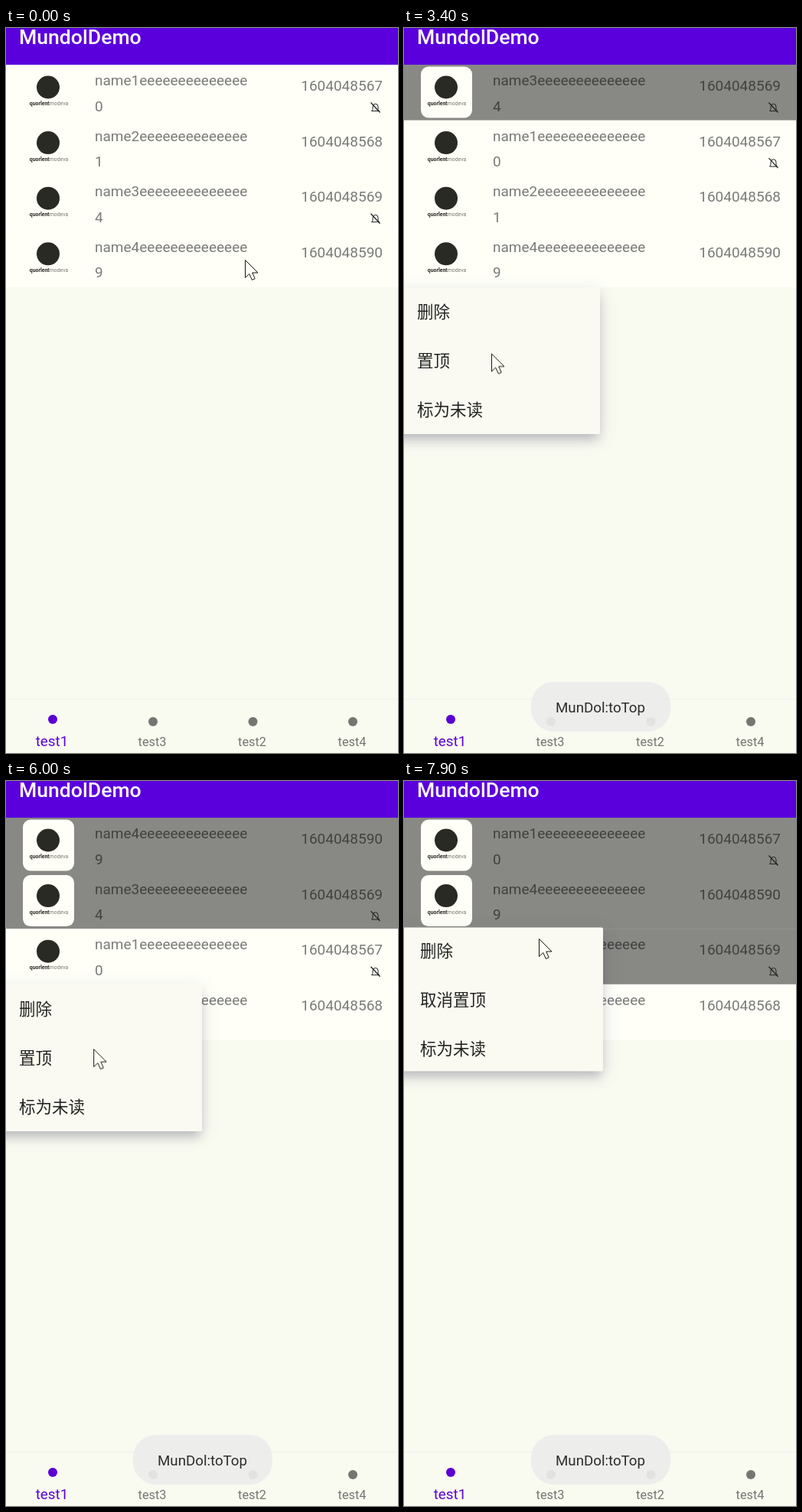
An HTML page that plays this animation: 512x948 px, repeating every 8000 ms.

```html
<!DOCTYPE html>
<html lang="zh">
<head>
<meta charset="utf-8">
<title>Pinned chats</title>
<style>
html, body { margin: 0; width: 100%; height: 100%; overflow: hidden; background: #f9faf0; }
#stage { position: relative; width: 512px; height: 948px; overflow: hidden; }
svg { position: absolute; left: 0; top: 0; overflow: visible; }
text { font-family: Roboto, sans-serif; }
.body { font-size: 19px; fill: rgba(0, 0, 0, .52); }
.icon { fill: none; stroke: #222220; }
.menu {
  position: absolute; left: -20px; width: 276px; height: 192px;
  display: flex; flex-direction: column; justify-content: center; overflow: hidden;
  background: #fafaf2; border-radius: 2px;
  box-shadow: 0 9px 13px -3px rgba(40, 40, 60, .25), 0 6px 24px rgba(90, 90, 140, .15);
}
.item {
  position: relative; flex: none; height: 64px; padding-left: 37px;
  font: 21.5px/62px "Noto Sans CJK SC", "Noto Sans CJK", sans-serif; color: #222220;
}
.ripple { position: absolute; inset: 0; background: rgba(0, 0, 0, .14); }
</style>
</head>
<body>
<div id="stage"></div>
<script>
const LOOP = 8000, STEP = 100, ROW_TOP = 48.3, ROW = 72.6;
const HARD = 'step-end';
const stage = document.getElementById('stage');
const anims = [];

// frames: [ms, properties, easing]
function play(el, frames) {
  const first = frames[0], last = frames[frames.length - 1];
  const all = [[0, first[1], HARD], ...frames, [LOOP, last[1]]];
  const anim = el.animate(
    all.map(([ms, props, easing = 'linear']) => ({ offset: ms / LOOP, easing, ...props })),
    { duration: LOOP, fill: 'both' });
  anim.pause();
  anims.push(anim);
}

function add(html) {
  stage.insertAdjacentHTML('beforeend', html);
  return stage.lastElementChild;
}

const text = (x, y, str, attrs = 'class="body"') => `<text x="${x}" y="${y}" ${attrs}>${str}</text>`;

// Conversation list
const chats = {
  1: { count: 0, stamp: 1604048567, muted: true },
  2: { count: 1, stamp: 1604048568 },
  3: { count: 4, stamp: 1604048569, muted: true },
  4: { count: 9, stamp: 1604048590 }
};

const bell = `<g class="icon" transform="translate(475.5 97)">
  <path d="M2 11.5h10l-1.5-2V6a3.5 3.8 0 0 0-7 0v3.5z"/><path d="M1 .5l12 13" stroke-width="1.3"/></g>`;

function row(id, index, pinned) {
  const { count, stamp, muted } = chats[id];
  const back = pinned
    ? `<rect y="48" width="512" height="73" fill="#888884"/>
       <rect x="22" y="50.5" width="67" height="67" rx="10" fill="#fffff8"/>`
    : '<rect y="48" width="512" height="73" fill="#fffff8"/>';
  return `<g transform="translate(0 ${index * ROW})">${back}
    <circle cx="55" cy="77.5" r="15" fill="#2a2a24"/>
    <text x="56" y="101" font-size="6.9" text-anchor="middle" fill="#2a2a24"><tspan
      font-weight="700">quorlent</tspan><tspan fill="#777770">modeva</tspan></text>
    ${text(116, 75, `name${id}${'e'.repeat(14)}`)}
    ${text(116, 108.5, count)}
    ${text(492, 82, stamp, 'class="body" text-anchor="end"')}
    ${muted ? bell : ''}</g>`;
}

const lists = [
  { from: 0, to: 2150, order: [1, 2, 3, 4], pins: 0 },
  { from: 2150, to: 4500, order: [3, 1, 2, 4], pins: 1 },
  { from: 4500, to: 6850, order: [4, 3, 1, 2], pins: 2 },
  { from: 6850, to: LOOP, order: [1, 4, 3, 2], pins: 3 }
];

for (const { from, to, order, pins } of lists) {
  const el = add(`<svg width="512" height="948">${order.map((id, i) => row(id, i, i < pins)).join('')}</svg>`);
  play(el, [
    [0, { opacity: from ? 0 : 1 }, HARD],
    [from, { opacity: 1 }, HARD],
    [to, { opacity: 0 }, HARD]
  ]);
}

// App bar and tabs
function tab(x, label, active) {
  const fill = active ? '#5a00d4' : '#757572';
  return `<circle cx="${x + 1}" cy="${active ? 904 : 907}" r="6" fill="${fill}"/>
    ${text(x, 939, label, `text-anchor="middle" font-size="${active ? 18.9 : 16.3}" fill="${fill}"`)}`;
}

add(`<svg width="512" height="948">
  <rect width="512" height="48" fill="#5a00dd"/>
  ${text(17, 21, 'MundolDemo', 'font-size="26.6" font-weight="500" fill="#fffff8"')}
  <rect y="877" width="512" height="1" fill="#f1f1ee"/>
  ${tab(60, 'test1', true)}${tab(191, 'test3')}${tab(321.5, 'test2')}${tab(452, 'test4')}
</svg>`);

// Popup menus
const menus = [
  { row: 3, open: 1050, press: 1760, close: 2000 },
  { row: 4, open: 2950, press: 4060, close: 4350 },
  { row: 3, open: 5550, press: 6350, close: 6670 },
  { row: 2, open: 7750, pinned: true }
];

for (const { row, open, press, close, pinned } of menus) {
  const labels = ['删除', pinned ? '取消置顶' : '置顶', '标为未读'];
  const el = add(`<div class="menu" style="top:${ROW_TOP + row * ROW - .2}px">${
    labels.map((s, i) => `<div class="item">${press && i === 1 ? '<div class="ripple"></div>' : ''}${s}</div>`).join('')
  }</div>`);
  const pose = (opacity, height, x, y) => ({ opacity, height: height + 'px', transform: `translate(${x}px, ${y}px)` });
  const frames = [
    [open, pose(0, 70, 20, -12)],
    [open + 150, pose(1, 188, 4, -1.5)],
    [open + 250, pose(1, 192, 0, 0)]
  ];
  if (close) frames.push([close, pose(1, 192, 0, 0)], [close + 150, pose(0, 192, 0, 0)]);
  play(el, frames);

  const spot = (opacity, r) => ({ opacity, clipPath: `circle(${r}px at 135px 32px)` });
  if (press) {
    play(el.querySelector('.ripple'),
      [[press, spot(0, 10)], [press + 40, spot(1, 35)], [press + 240, spot(1, 139)], [press + 280, spot(1, 170)]]);
  }
}

// Toast
const toast = add(`<svg width="512" height="948">
  <rect x="166" y="855" width="182" height="65" rx="30" fill="#ececec" fill-opacity=".92"/>
  ${text(256.5, 895, 'MunDol:toTop', 'font-size="18.7" text-anchor="middle" fill="#2c2c2a"')}</svg>`);
play(toast, [
  [2200, 0], [2400, 1], [4200, 1], [4500, 0],
  [4700, 0], [4950, 1], [6600, 1], [6770, 0],
  [7000, 0], [7250, 1]
].map(([ms, opacity]) => [ms, { opacity }]));

// Pointer: rests on a row for the long press, then picks the second menu item
const pointer = add(`<svg width="18" height="28">
  <path d="M.5 .5V23.5l5.3-5 3.6 8 3.8-1.7-3.5-7.8h7.3z" fill="#fffff8" stroke="#15150a"/></svg>`);
play(pointer, [
  [0, 312, 303], [450, 300, 235], [1000, 300, 235], [1550, 116, 351], [1850, 116, 351],
  [2450, 234, 277], [2900, 234, 277], [3450, 112, 428], [4100, 112, 428],
  [4300, 137, 376], [4800, 243, 242], [5500, 243, 242], [6050, 112, 352], [6450, 112, 352],
  [6700, 144, 262], [7100, 214, 161], [7700, 214, 161], [7900, 176, 206]
].map(([ms, x, y]) => [ms, { transform: `translate(${x}px, ${y}px)` }, 'ease-in-out']));

const start = performance.now();
function tick() {
  const now = (performance.now() - start) % LOOP;
  const time = Math.floor(now / STEP) * STEP;
  for (const anim of anims) anim.currentTime = time;
  requestAnimationFrame(tick);
}
tick();
</script>
</body>
</html>
```
